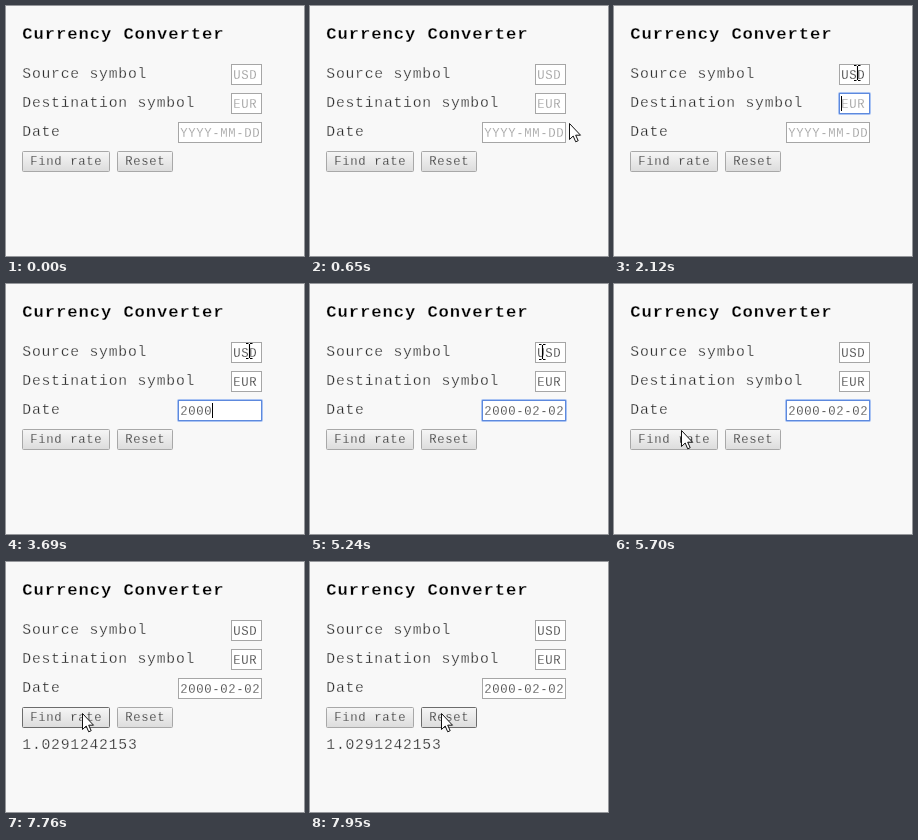
These frames come from a looping animation (298 by 250 pixels, 8 s). An HTML page:

```html
<!DOCTYPE html>
<html lang="en">
<head>
<meta charset="utf-8">
<title>Currency Converter</title>
<style>
html, body { margin: 0; width: 100%; height: 100%; overflow: hidden; background: #f8f8f8; }
svg { display: block; }
/* slightly smaller, thinned glyphs with open spacing give a light typewriter look */
text {
  --size: 13.333px;
  font-family: "Liberation Mono", "Courier New", monospace;
  font-size: calc(var(--size) * .92);
  letter-spacing: calc(var(--size) * .048);
  transform: translateX(.3px);
  fill: #222; stroke: #fff; stroke-width: .3px; white-space: pre;
}
.label { --size: 16px; fill: #2a2a2a; stroke: #f8f8f8; }
.title { --size: 18.72px; font-weight: bold; fill: #000; stroke: #f8f8f8; }
.caption { stroke: #eaeaea; }
.box { fill: #fff; stroke: #a6a6a6; }
.ring { fill: none; stroke: #a9c3f3; stroke-width: 2; }
.focus .box { stroke: #5d89dd; }
.button { fill: url(#face); stroke: #a8a8a8; }
.button.hover { stroke: #6c6c6c; }
.button.down { fill: #dcdcdc; }
.empty { fill: #8c8c8c; }
</style>
</head>
<body>
<svg width="298" height="250" viewBox="0 0 298 250">
  <defs>
    <linearGradient id="face" x2="0" y2="1">
      <stop stop-color="#f6f6f6"/><stop offset="1" stop-color="#dcdcdc"/>
    </linearGradient>
  </defs>
  <text class="title" x="16" y="33">Currency Converter</text>
  <text class="label" x="16" y="72">Source symbol</text>
  <text class="label" x="16" y="101">Destination symbol</text>
  <text class="label" x="16" y="130">Date</text>
  <g id="fields"></g>
  <rect id="find" class="button" x="16.5" y="145.5" width="87" height="20" rx="1"/>
  <text class="caption" x="24" y="159">Find rate</text>
  <rect id="reset" class="button" x="111.5" y="145.5" width="55" height="20" rx="1"/>
  <text class="caption" x="119" y="159">Reset</text>
  <text id="result" class="label" x="16" y="187">1.0291242153</text>
  <path id="squiggle" d="M227 75.5l2-1 2 1 2-1 2 1 2-1 2 1 2-1 2 1 2-1 2 1 2-1 2 1" fill="none" stroke="#e44"/>
  <path id="caret" d="M.5 0v15" stroke="#000"/>
  <circle id="click" r="9.9" fill="none" stroke="#111" stroke-width="1.2"/>
  <path id="arrow" d="M.5.5V16.5L4.2 13 6.7 18.8 9.2 17.7 6.7 12.2H11.5Z" fill="#fff" stroke="#111"/>
  <path id="beam" d="M-3 -7.5h2.5M1 -7.5h2.5M-3 7.5h2.5M1 7.5h2.5M.5 -7v14" fill="none" stroke="#000" stroke-width="1.1"/>
</svg>
<script>
const LOOP = 8000, CHAR = 8;
const $ = id => document.getElementById(id);
const show = (el, on) => el.setAttribute('visibility', on ? 'visible' : 'hidden');
const move = (el, x, y) => el.setAttribute('transform', `translate(${x} ${y})`);

// keys: [time, number of characters typed]
const fields = [
  { x: 225, y: 58, hint: 'USD', value: 'USD', focus: [1130, 2120], keys: [[1680, 2], [1780, 3]] },
  { x: 225, y: 87, hint: 'EUR', value: 'EUR', focus: [2120, 2850], keys: [[2540, 2], [2640, 3]] },
  { x: 172, y: 116, hint: 'YYYY-MM-DD', value: '2000-02-02', focus: [2850, 6020],
    keys: [[3230, 1], [3320, 2], [3690, 4], [3900, 5], [4100, 6], [4250, 7], [4490, 8], [4630, 9], [4710, 10]] }
];

for (const f of fields) {
  f.w = f.hint.length * CHAR + (f.hint.length > 3 ? 4 : 7);
  f.group = document.createElementNS('http://www.w3.org/2000/svg', 'g');
  f.group.innerHTML = `<rect class="ring" x="${f.x}" y="${f.y}" width="${f.w}" height="21" rx="1"/>
    <rect class="box" x="${f.x + .5}" y="${f.y + .5}" width="${f.w - 1}" height="20"/>
    <text x="${f.x + 2}" y="${f.y + 14.5}"></text>`;
  $('fields').append(f.group);
  [f.ring, , f.text] = f.group.children;
}

// pointer stops: [time, x, y]
const stops = [
  [450, 271, 163], [560, 266, 140], [700, 255, 104], [830, 246, 76], [940, 243, 67],
  [5200, 243, 67], [5320, 212, 69], [5440, 150, 79], [5550, 96, 108], [5630, 75, 132],
  [5700, 67, 146], [5800, 67, 151],
  [7720, 67, 151], [7800, 85, 151], [7890, 119, 151], [7950, 131, 151]
];

function pointer(t) {
  const i = stops.findIndex(s => s[0] > t);
  if (i < 1) return stops[stops.length - 1].slice(1);
  const [a, b] = [stops[i - 1], stops[i]];
  const p = (t - a[0]) / (b[0] - a[0]);
  return [1, 2].map(k => a[k] + (b[k] - a[k]) * p);
}

const between = (t, [from, to]) => t >= from && t < to;
const inside = (px, py, x, y, w) => px >= x && px < x + w && py >= y && py < y + 21;

function render(t) {
  const seen = t >= 450;
  const [px, py] = seen ? pointer(t) : [-50, -50];
  let caret = false, beam = false;

  for (const f of fields) {
    const typed = f.keys.reduce((n, [at, count]) => t >= at ? count : n, 0);
    const focused = between(t, f.focus);
    f.text.textContent = typed ? f.value.slice(0, typed) : f.hint;
    f.text.classList.toggle('empty', !typed);
    f.group.classList.toggle('focus', focused);
    show(f.ring, focused);
    if (focused && typed < 10) {
      caret = true;
      move($('caret'), f.x + 2 + typed * CHAR, f.y + 3);
    }
    beam ||= inside(px, py, f.x, f.y, f.w);
  }
  show($('caret'), caret);

  show($('beam'), seen && beam);
  show($('arrow'), seen && !beam);
  move($('beam'), Math.round(px), Math.round(py));
  move($('arrow'), Math.round(px), Math.round(py));

  show($('click'), between(t, [1130, 1370]) || between(t, [6020, 6170]));
  move($('click'), px - .5, py + .5);
  show($('squiggle'), between(t, [1940, 2120]));
  show($('result'), t >= 6230);

  $('find').classList.toggle('hover', inside(px, py, 16, 148, 88));
  $('find').classList.toggle('down', between(t, [6020, 6170]));
  $('reset').classList.toggle('hover', inside(px, py, 111, 148, 56));
}

const start = performance.now();
function tick() {
  render((performance.now() - start) % LOOP);
  requestAnimationFrame(tick);
}
tick();
</script>
</body>
</html>
```
